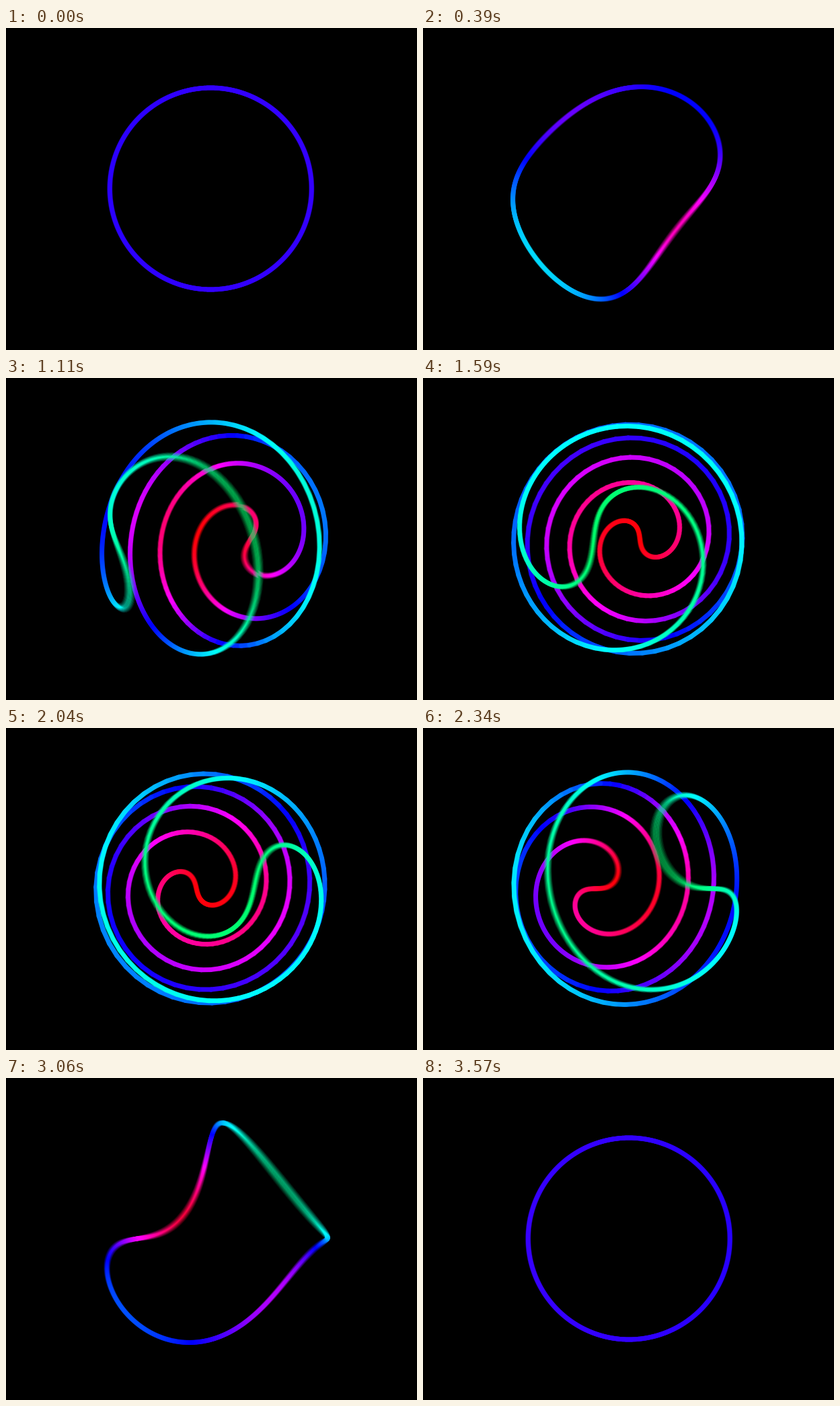
Animation, 611 px wide and 479 px high, one loop 3600 ms. Source, as an HTML page with a canvas:

```html
<!DOCTYPE html>
<html lang="en">
<head>
<meta charset="utf-8">
<title>Twisting circle</title>
<style>
  html, body { margin: 0; width: 100%; height: 100%; overflow: hidden; background: #000; }
  canvas { display: block; }
</style>
</head>
<body>
<canvas id="stage" width="611" height="479"></canvas>
<script>
const W = 611, H = 479, CX = 305, CY = 239;
const R = 150;            // sphere radius
const CAMERA = 2;         // camera distance in radii
const STROKE = 7;
const FRAMES = 120, STEP = 30;
const SAMPLES = 10, SHUTTER = 0.7;
const POINTS = 480;
const TWIST = 3 * Math.PI;

const stage = document.getElementById('stage').getContext('2d');
const layer = document.createElement('canvas');
layer.width = W;
layer.height = H;
const pen = layer.getContext('2d');
pen.lineWidth = STROKE;
pen.lineCap = 'round';

const smooth = p => p * p * (3 - 2 * p);
const sharpen = (p, g) => p < 0.5 ? (2 * p) ** g / 2 : 1 - (2 - 2 * p) ** g / 2;
const ease = p => sharpen(smooth(p), 1.35);

// A great circle through the poles, each point turned about the pole axis by its height.
function project(angle, twist, sin, cos) {
  const u = Math.cos(angle), s = Math.sin(angle);
  const w = -s * Math.sin(twist * u);
  const x = u * sin + w * cos;
  const y = s * Math.cos(twist * u);
  const z = u * cos - w * sin;
  const scale = R * CAMERA / (CAMERA - z);
  return { x: CX + x * scale, y: CY - y * scale, z };
}

function drawCurve(p) {
  const twist = TWIST * ease(1 - Math.abs(1 - 2 * p));
  const turn = (p - 0.5) * Math.PI;
  const sin = Math.sin(turn), cos = Math.cos(turn);
  const pts = Array.from({ length: POINTS }, (_, i) =>
    project(i / POINTS * 2 * Math.PI, twist, sin, cos));
  const segs = pts.map((a, i) => {
    const b = pts[(i + 1) % POINTS];
    return { a, b, z: (a.z + b.z) / 2 };
  }).sort((m, n) => m.z - n.z);

  pen.fillStyle = '#000';
  pen.fillRect(0, 0, W, H);
  for (const { a, b, z } of segs) {
    pen.strokeStyle = `hsl(${252 - 108 * z}, 100%, 50%)`;
    pen.beginPath();
    pen.moveTo(a.x, a.y);
    pen.lineTo(b.x, b.y);
    pen.stroke();
  }
}

// Motion blur: running average of several moments within the shutter time.
function render(frame) {
  for (let i = 0; i < SAMPLES; i++) {
    drawCurve((frame + SHUTTER * (i + 0.5) / SAMPLES) / FRAMES);
    stage.globalAlpha = 1 / (i + 1);
    stage.drawImage(layer, 0, 0);
  }
}

let shown = -1;
function tick() {
  const frame = Math.floor((performance.now() + 0.5) / STEP) % FRAMES;
  if (frame !== shown) render(shown = frame);
  requestAnimationFrame(tick);
}
tick();
</script>
</body>
</html>
```
